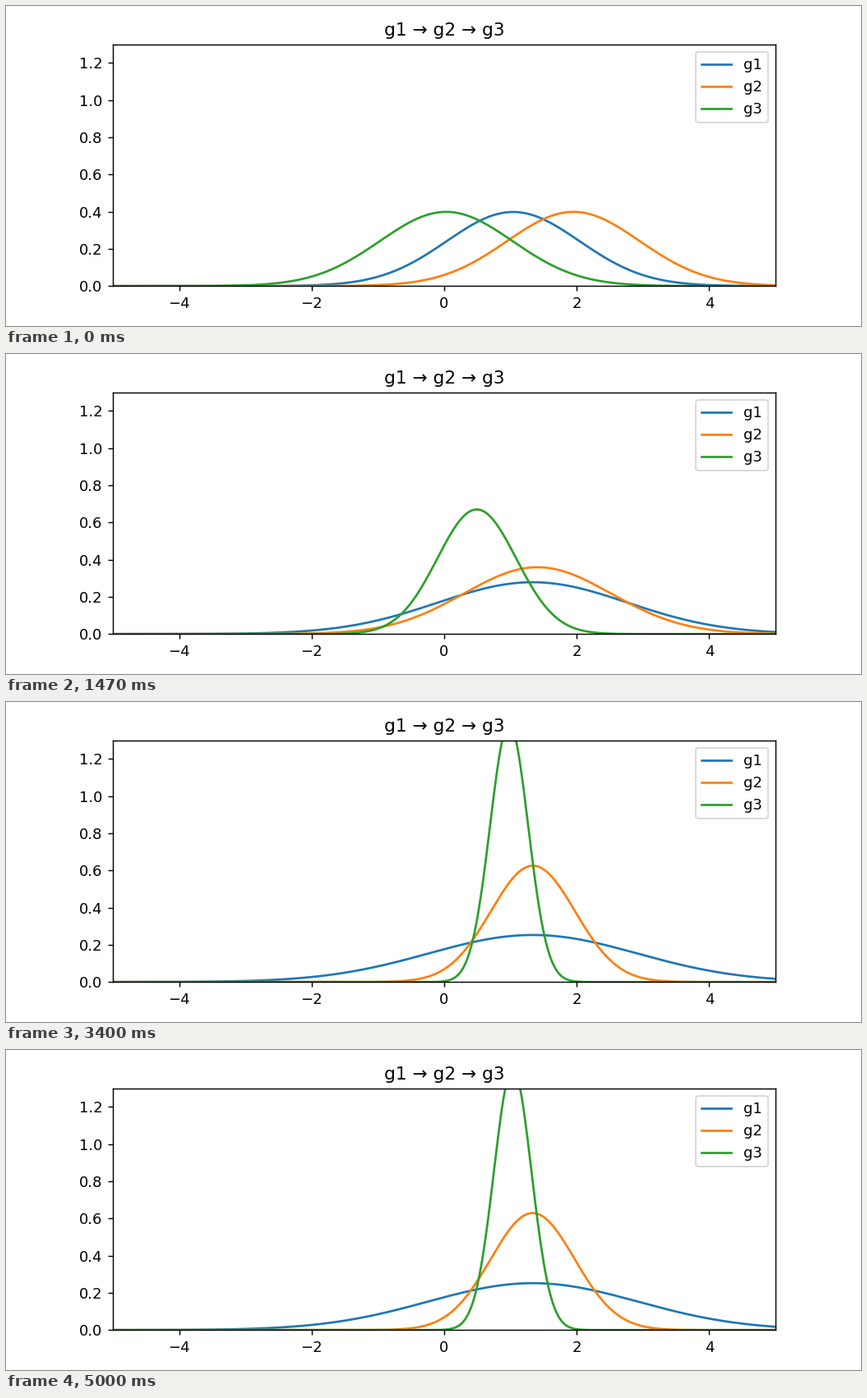
A matplotlib script that plays this animation: 1040x390 px, repeating every 5070 ms.

```python
import numpy as np
import matplotlib.pyplot as plt
from matplotlib.animation import FuncAnimation

FRAMES = 76
INTERVAL = 66.66  # 15 frames per second


def decay(t, tau):
    return np.exp(-t / tau)


def drop(t, mid, width):
    """Soft switch from 1 to 0 around mid."""
    return 1 / (1 + np.exp((t - mid) / width))


def glide(t, start, end, speed, soft):
    """Steady approach that eases out within `soft` of the end."""
    gap = (end - start) / soft
    return end - soft * np.arcsinh(np.sinh(gap) * np.exp(-speed * t / soft))


def params(t):
    """Mean and standard deviation of every curve at step t."""
    return {
        "g1": (1.338 - 0.298 * decay(t, 5),
               1.583 - 0.583 * decay(t, 17) * drop(t, 42, 7)),
        "g2": (1.335 + 0.615 * decay(t, 10.3),
               0.634 + (0.566 - 0.2 * decay(t, 13)) * drop(t, 30.8, 4)),
        "g3": (glide(t, 0.03, 1.037, 0.021, 0.17),
               0.284 + 0.716 * decay(t, 26.6) * drop(t, 39.6, 3.4)),
    }


def gauss(x, mean, sigma):
    return np.exp(-0.5 * ((x - mean) / sigma) ** 2) / (sigma * np.sqrt(2 * np.pi))


fig, ax = plt.subplots(figsize=(8, 3), dpi=130)
fig.subplots_adjust(left=0.125, right=0.9, bottom=0.125, top=0.88)
ax.set_xlim(-5, 5)
ax.set_ylim(0, 1.3)
ax.set_yticks(np.arange(0, 1.3, 0.2))
ax.set_title("g1 → g2 → g3")

x = np.linspace(-5, 5, 500)
lines = {name: ax.plot(x, gauss(x, *p), label=name)[0]
         for name, p in params(0).items()}
ax.legend(loc="upper right")


def update(step):
    for name, p in params(step).items():
        lines[name].set_ydata(gauss(x, *p))
    return list(lines.values())


anim = FuncAnimation(fig, update, frames=FRAMES, interval=INTERVAL,
                     repeat=True, repeat_delay=0, blit=False)
plt.show()
```
